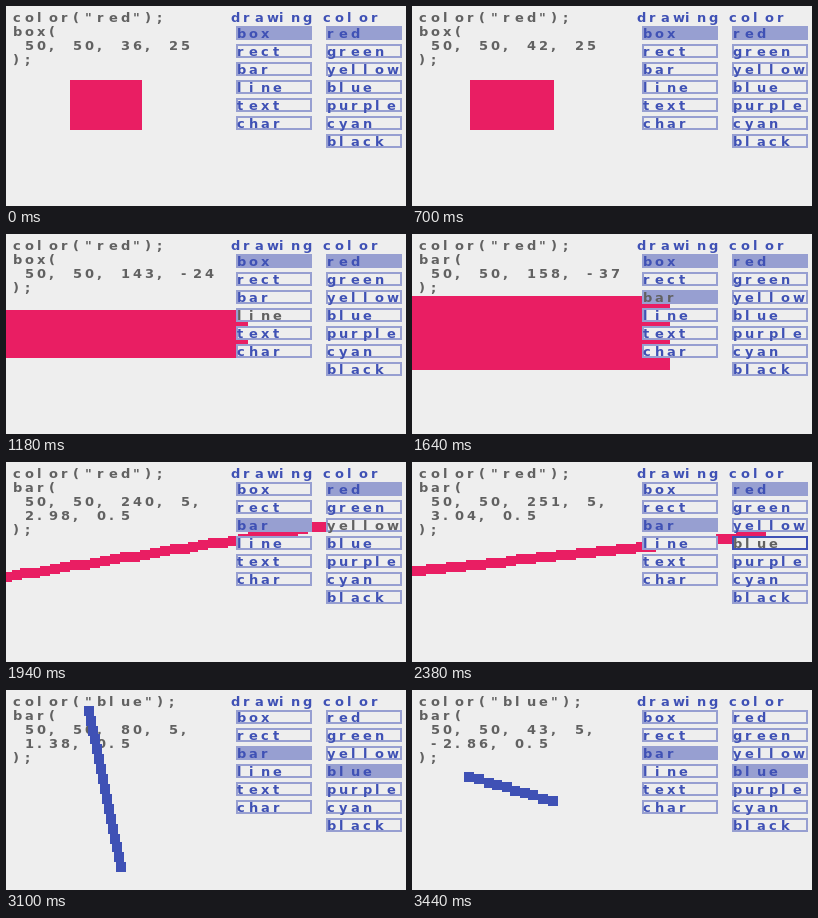
These frames come from a looping animation (400x200 px, 3.6 s). An HTML page:

```html
<!DOCTYPE html>
<html lang="en">
<head>
<meta charset="utf-8">
<title>Drawing playground</title>
<style>
  html, body { margin: 0; width: 100%; height: 100%; overflow: hidden; background: #eee; }
  svg { display: block; width: 100vw; height: 100vh; }
  text {
    font: bold 13px "DejaVu Sans", sans-serif;
    white-space: pre;
    fill: currentColor;
  }
</style>
</head>
<body>
<svg id="stage" viewBox="0 0 400 200"></svg>
<script>
const LOOP = 3600, STEP = 20, CELL = 12;
const RED = "#e91e63", BLUE = "#3f51b5", PALE = "#979fd1", INK = "#616161", PAPER = "#eeeeee";

// pointer path: time, x, y on a 200 x 100 grid
const path = [
  [0, 68, 62.5], [20, 68.5, 62.5], [400, 70.5, 62.5], [680, 70.5, 62.5], [700, 71, 62.5],
  [1180, 121.5, 38], [1220, 124, 33.5], [1240, 125.5, 33], [1320, 129, 31.5],
  [1640, 129, 31.5], [2000, 172, 31], [2020, 172, 31], [2340, 174.9, 37.3],
  [2600, 174.9, 37.3], [2860, 46, 2.4], [3020, 46, 2.4], [3100, 42.4, 10.7],
  [3200, 23, 34], [3280, 24, 62], [3360, 48, 77], [3440, 70.7, 56], [3600, 70.7, 56]
];
// press, release
const clicks = { bar: [1480, 1640], blue: [2380, 2500] };

const stage = document.getElementById("stage");

function add(tag, attrs) {
  const el = document.createElementNS("http://www.w3.org/2000/svg", tag);
  for (const k in attrs) el.setAttribute(k, attrs[k]);
  return stage.appendChild(el);
}

// every character starts at its own grid cell
function write(el, x, str) {
  el.setAttribute("x", Array.from(str, (_, i) => x + CELL * i).join(" "));
  el.textContent = str;
}

function label(x, y, color, str = "") {
  const el = add("text", { y, color });
  write(el, x, str);
  return el;
}

const CODE_X = 7;
const code = [16, 30, 44, 58, 72].map(y => label(CODE_X, y, INK));
const shape = add("path", { "shape-rendering": "crispEdges" });
const buttons = [];

function column(title, titleX, x, names) {
  label(titleX, 16, BLUE, title);
  names.forEach((name, i) => {
    const y = 20 + 18 * i;
    const box = { "shape-rendering": "crispEdges" };
    buttons.push({
      name, x, y,
      frame: add("rect", { x, y, width: 76, height: 14, ...box }),
      face: add("rect", { x: x + 2, y: y + 2, width: 72, height: 10, fill: PAPER, ...box }),
      text: label(x + 1, y + 12, BLUE, name)
    });
  });
}
column("drawing", 225, 230, ["box", "rect", "bar", "line", "text", "char"]);
column("color", 317, 320, ["red", "green", "yellow", "blue", "purple", "cyan", "black"]);

// slope of the path at a key; zero next to a rest
function slope(i, k) {
  const a = path[i - 1], b = path[i], c = path[i + 1];
  if (!a || !c || a[k] === b[k] || b[k] === c[k]) return 0;
  return (c[k] - a[k]) / (c[0] - a[0]);
}

function pointer(t) {
  let i = 0;
  while (i < path.length - 2 && path[i + 1][0] <= t) i++;
  const a = path[i], b = path[i + 1], d = b[0] - a[0], u = (t - a[0]) / d;
  const s = u * u * (3 - 2 * u);
  return [1, 2].map(k =>
    a[k] + (b[k] - a[k]) * s +
    d * u * (1 - u) * ((1 - u) * slope(i, k) - u * slope(i + 1, k)));
}

const cell = (x, y, w, h) => `M${2 * x} ${2 * y}h${2 * w}v${2 * h}h${-2 * w}z`;

function boxPath(w, h) {
  const x = Math.floor(50 - w / 2), y = Math.floor(50 - h / 2);
  return cell(x, h < 0 ? y + h : y, w, Math.abs(h));
}

// a bar is a row of 5 x 5 blocks
function barPath(len, angle) {
  const lx = len * Math.cos(angle), ly = len * Math.sin(angle);
  const n = Math.max(2, Math.ceil(Math.max(Math.abs(lx), Math.abs(ly)) / 5));
  let d = "";
  for (let i = 0; i <= n; i++) {
    const r = i / n - .5;
    d += cell(Math.floor(47.5 + lx * r), Math.floor(47.5 + ly * r), 5, 5);
  }
  return d;
}

function draw(t) {
  const [mx, my] = pointer(t);
  const toBar = clicks.bar[1], toBlue = clicks.blue[1];
  // the picture follows a choice one step later than the code
  const isBar = t >= toBar + STEP, isBlue = t >= toBlue + STEP;

  let args;
  if (isBar) {
    const len = Math.floor(2 * Math.hypot(mx - 50, my - 50));
    const angle = Math.atan2(50 - my, 50 - mx);
    args = [` 50, 50, ${len}, 5,`, ` ${Math.round(angle * 100) / 100}, 0.5`];
    shape.setAttribute("d", barPath(len, angle));
  } else {
    const w = Math.round(2 * (mx - 50)), h = Math.round(2 * (my - 50));
    args = [` 50, 50, ${w}, ${h}`];
    shape.setAttribute("d", boxPath(w, h));
  }
  shape.setAttribute("fill", isBlue ? BLUE : RED);

  const lines = [
    `color("${t >= toBlue ? "blue" : "red"}");`,
    t >= toBar ? "bar(" : "box(",
    ...args,
    ");"
  ];
  code.forEach((el, i) => write(el, CODE_X, lines[i] || ""));

  const chosen = { box: !isBar, bar: t >= toBar, red: !isBlue, blue: t >= toBlue };
  for (const b of buttons) {
    const px = 2 * mx - b.x, py = 2 * my - b.y;
    const hover = px >= 0 && px <= 76 && py >= 0 && py <= 14;
    const click = clicks[b.name];
    const pressed = click && t >= click[0] && t < click[1];
    b.frame.setAttribute("fill", pressed ? BLUE : PALE);
    b.face.setAttribute("visibility", chosen[b.name] ? "hidden" : "visible");
    b.text.setAttribute("color", hover ? INK : BLUE);
  }
}

const start = performance.now();
function tick() {
  const t = (performance.now() - start) % LOOP;
  draw(Math.floor(t / STEP) * STEP);
  requestAnimationFrame(tick);
}
tick();
</script>
</body>
</html>
```
